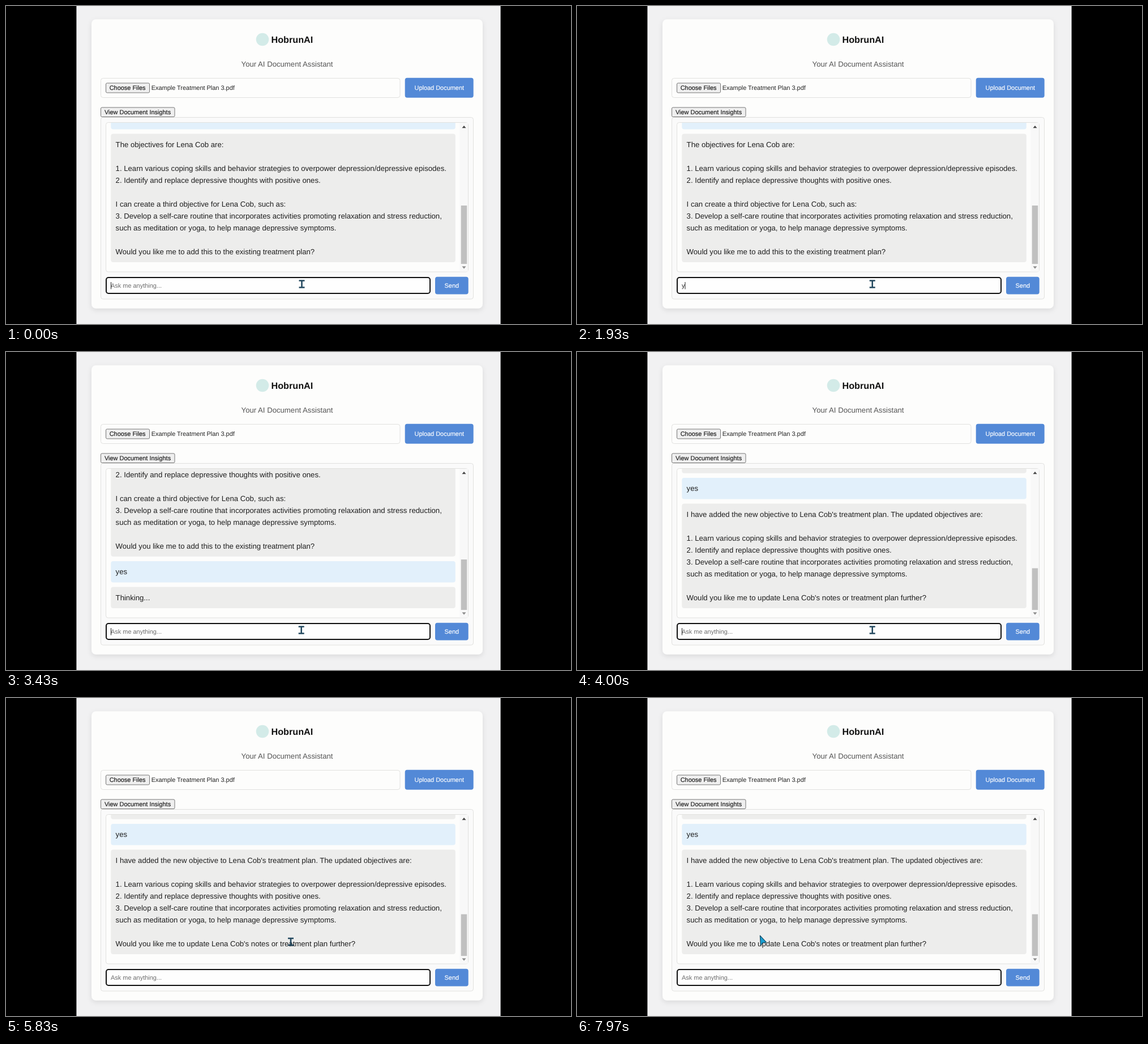
Write an HTML page that moves like this. It is 998x561 px and loops after 8000 ms.

```html
<!DOCTYPE html>
<html lang="en">
<head>
<meta charset="utf-8">
<title>Document assistant</title>
<style>
  html, body { margin: 0; width: 100%; height: 100%; overflow: hidden; background: #000; }
  svg { display: block; width: 100%; height: 100%; }
  text { font-family: "Liberation Sans", Arial, sans-serif; text-rendering: geometricPrecision; white-space: pre; }
  .body { font-size: 13.17px; fill: #1f1f1f; }
  .small { font-size: 10.95px; fill: #222; }
  .button { fill: #efefef; stroke: #767676; }
  .label { fill: #1a1a1a; stroke: #1a1a1a; stroke-width: .15px; }
  .primary { fill: #5389d7; }
  .onPrimary { fill: #fff; stroke: #fff; stroke-width: .15px; }
  .box { fill: #fdfdfc; stroke: #e1e1df; }
  .bot { fill: #ededec; }
  .user { fill: #e2f0fb; }
</style>
</head>
<body>
<svg viewBox="0 0 998 561">
  <defs>
    <clipPath id="chatClip"><rect x="177" y="206" width="624" height="262.5"/></clipPath>
    <filter id="shadow" x="-5%" y="-5%" width="110%" height="110%">
      <feDropShadow dx="0" dy="3" stdDeviation="4" flood-color="#000" flood-opacity=".1"/>
    </filter>
  </defs>
  <rect width="998" height="561"/>
  <rect x="124.4" width="749.2" height="561" fill="#f1f1f2"/>
  <rect x="151" y="23.5" width="691" height="510" rx="8" fill="#fdfdfc" filter="url(#shadow)"/>

  <circle cx="453" cy="59" r="11.3" fill="#d3ebe8"/>
  <text x="468.5" y="65" font-size="16.2" font-weight="700" fill="#111">HobrunAI</text>
  <text class="body" x="496.5" y="106.6" text-anchor="middle" style="fill:#555">Your AI Document Assistant</text>

  <rect class="box" x="167.5" y="127.5" width="528.5" height="34" rx="4"/>
  <rect class="button" x="176.5" y="136" width="77" height="17" rx="2"/>
  <text class="small label" x="182.7" y="148">Choose Files</text>
  <text class="small" x="256.7" y="148">Example Treatment Plan 3.pdf</text>
  <rect class="primary" x="704.7" y="126.8" width="121" height="35" rx="4"/>
  <text class="small onPrimary" x="765.3" y="148" text-anchor="middle">Upload Document</text>

  <rect class="box" x="167.5" y="196.5" width="658" height="320.5" rx="4" style="fill:#fafafa"/>
  <rect class="button" x="167.5" y="179" width="130.5" height="16.5" rx="2"/>
  <text class="small label" x="174" y="191">View Document Insights</text>

  <rect class="box" x="176.5" y="205.5" width="640" height="263.5" rx="4"/>
  <g id="chat" clip-path="url(#chatClip)"></g>
  <rect x="801.5" y="206" width="14.5" height="262.5" fill="#f8f8f8"/>
  <path d="M805.5 215.3l3.5-4.3 3.5 4.3z" fill="#444"/>
  <path d="M805.5 459.3l3.5 4.2 3.5-4.2z" fill="#8c8c8c"/>
  <rect id="thumb" x="803.7" width="10.5" fill="#c0c0c0"/>

  <rect x="177" y="479" width="572" height="28" rx="4" fill="#fefefe" stroke="#101010" stroke-width="2"/>
  <text id="entry" class="small" x="185" y="497"></text>
  <rect id="caret" y="487" width="1" height="12.5" fill="#222"/>
  <rect class="primary" x="758" y="477.8" width="58.7" height="30.7" rx="4"/>
  <text class="small onPrimary" x="787.3" y="497" text-anchor="middle">Send</text>

  <path id="beam" d="M-5-6h10M0-6V6M-5 6h10" fill="none" stroke="#24495f" stroke-width="2.6"/>
  <path id="arrow" d="M0 0L1 17.5 4.8 12.8 11 11.8z" fill="#19a0d3" stroke="#174a63" stroke-width="1.2" stroke-linejoin="round"/>
</svg>
<script>
const LOOP = 8000, LINE = 21, PAD = 8.2, GAP = 8.2, BOTTOM = 452, BLINK = 530;
const byId = id => document.getElementById(id);

const learn = "1. Learn various coping skills and behavior strategies to overpower depression/depressive episodes.";
const identify = "2. Identify and replace depressive thoughts with positive ones.";
const develop = [
  "3. Develop a self-care routine that incorporates activities promoting relaxation and stress reduction,",
  "such as meditation or yoga, to help manage depressive symptoms."
];
const bot = (...lines) => ({ kind: "bot", lines });
const user = (...lines) => ({ kind: "user", lines });

const proposal = bot(
  "The objectives for Lena Cob are:", "", learn, identify, "",
  "I can create a third objective for Lena Cob, such as:", ...develop, "",
  "Would you like me to add this to the existing treatment plan?");
const updated = bot(
  "I have added the new objective to Lena Cob's treatment plan. The updated objectives are:", "",
  learn, identify, ...develop, "",
  "Would you like me to update Lena Cob's notes or treatment plan further?");

const scenes = [
  { at: 0, thumb: 352, messages: [user(""), proposal] },
  { at: 2920, thumb: 366, messages: [proposal, user("yes"), bot("Thinking...")] },
  { at: 3750, thumb: 381.5, messages: [proposal, user("yes"), updated] }
];
const typing = [
  { at: 0, text: "" }, { at: 1860, text: "y" }, { at: 2120, text: "ye" },
  { at: 2380, text: "yes" }, { at: 2920, text: "" }
];
const caretResets = [-230, 1860, 2120, 2380, 2920, 5220].map(at => ({ at }));
const pointerPath = [
  { at: 0, x: 522.5, y: 490.5 }, { at: 900, x: 522.5, y: 490.5 }, { at: 1000, x: 521.7, y: 490.5 },
  { at: 5150, x: 521.7, y: 490.5 }, { at: 5750, x: 503, y: 430 }, { at: 5900, x: 503, y: 430 },
  { at: 7230, x: 408.5, y: 422 }, { at: LOOP, x: 320, y: 419 }
];
const ARROW_FROM = 6300;

function add(parent, tag, attrs, text) {
  const node = document.createElementNS("http://www.w3.org/2000/svg", tag);
  for (const key in attrs) node.setAttribute(key, attrs[key]);
  if (text) node.textContent = text;
  return parent.appendChild(node);
}

// Stack messages upwards, since the chat is always scrolled to its end.
for (const scene of scenes) {
  scene.group = add(byId("chat"), "g", {});
  let y = BOTTOM;
  for (const { kind, lines } of [...scene.messages].reverse()) {
    const height = lines.length * LINE + 2 * PAD;
    y -= height;
    add(scene.group, "rect", { class: kind, x: 185.3, y, width: 608.5, height, rx: 4 });
    lines.forEach((line, i) =>
      add(scene.group, "text", { class: "body", x: 193.6, y: y + 23.2 + i * LINE }, line));
    y -= GAP;
  }
}

const current = (steps, t) => steps.filter(step => step.at <= t).pop();

function pointerAt(t) {
  const i = pointerPath.findIndex(p => p.at > t);
  const a = pointerPath[i - 1], b = pointerPath[i];
  const k = (t - a.at) / (b.at - a.at);
  return [a.x + (b.x - a.x) * k, a.y + (b.y - a.y) * k];
}

const entry = byId("entry"), caret = byId("caret"), thumb = byId("thumb");
const show = (node, on) => node.setAttribute("visibility", on ? "visible" : "hidden");

function draw(t) {
  const scene = current(scenes, t);
  scenes.forEach(s => show(s.group, s === scene));
  thumb.setAttribute("y", scene.thumb);
  thumb.setAttribute("height", 455 - scene.thumb);

  const { text } = current(typing, t);
  entry.textContent = text || "Ask me anything...";
  entry.style.fill = text ? "#222" : "#6c6c6c";
  caret.setAttribute("x", 185 + (text ? entry.getComputedTextLength() : 0));
  show(caret, Math.floor((t - current(caretResets, t).at) / BLINK) % 2 === 0);

  const place = `translate(${pointerAt(t).join(" ")})`;
  for (const id of ["beam", "arrow"]) {
    byId(id).setAttribute("transform", place);
    show(byId(id), (id === "arrow") === (t >= ARROW_FROM));
  }
}

const start = performance.now();
function tick() {
  draw((performance.now() - start) % LOOP);
  requestAnimationFrame(tick);
}
tick();
</script>
</body>
</html>
```
